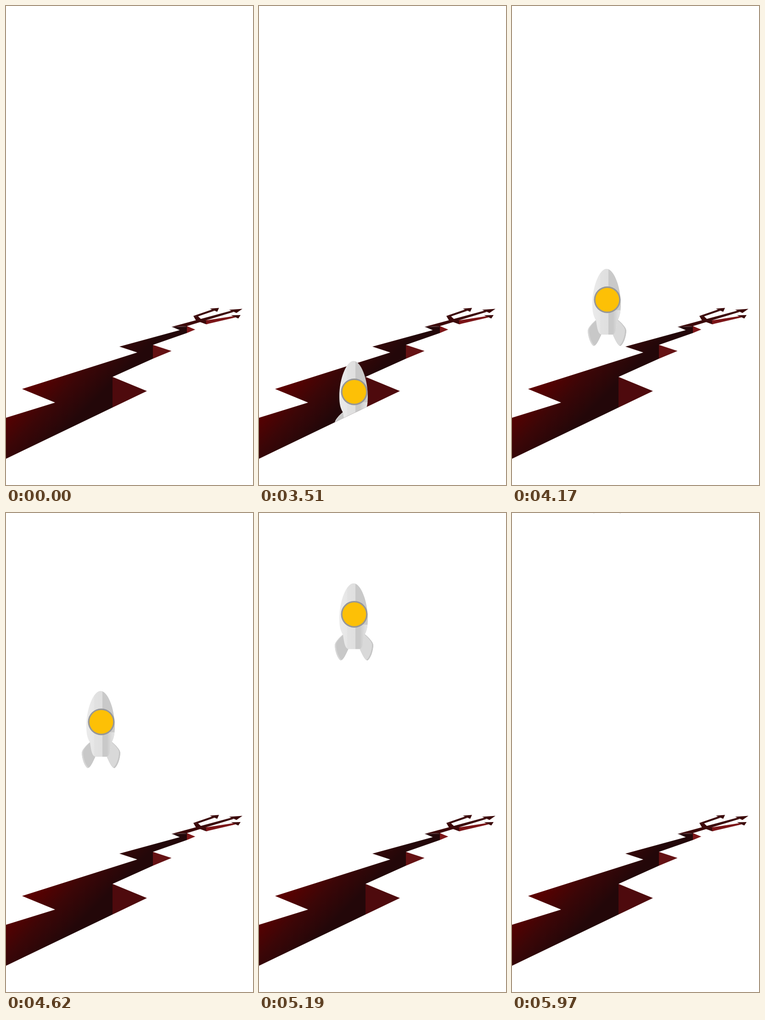
An HTML page with a canvas that plays this animation: 538 px wide and 1040 px high, repeating every 6.03 s.

```html
<!DOCTYPE html>
<html lang="en">
<head>
<meta charset="utf-8">
<title>Rocket launch</title>
<style>
html, body { margin: 0; width: 100%; height: 100%; overflow: hidden; background: #fff; }
canvas { display: block; width: 538px; height: 1040px; }
</style>
</head>
<body>
<canvas id="stage" width="538" height="1040"></canvas>
<script>
const W = 538, H = 1040;
const ctx = document.getElementById('stage').getContext('2d');

function trace(points) {
  ctx.beginPath();
  for (const [x, y] of points) ctx.lineTo(x, y);
  ctx.closePath();
}

function poly(fill, ...points) {
  trace(points);
  ctx.fillStyle = fill;
  ctx.fill();
}

function gradient(x0, y0, x1, y1, ...stops) {
  const g = ctx.createLinearGradient(x0, y0, x1, y1);
  for (const [at, color] of stops) g.addColorStop(at, color);
  return g;
}

const add = ([x, y], dx, dy) => [x + dx, y + dy];
const mix = ([x0, y0], [x1, y1], k) => [x0 + (x1 - x0) * k, y0 + (y1 - y0) * k];

// --- Crack: three notches shrinking into the distance ---

const RIGHT = 1.04; // right teeth are a little larger than left ones
const notches = [
  { left: [35, 831.5], right: [232, 805.3], w: 72, h: 29.5, drop: 66.5, face: '#4e0a0d' },
  { left: [247, 739.5], right: [320, 735.8], w: 39, h: 12.7, drop: 30, face: '#651214' },
  { left: [361, 696.5], right: [394, 695], w: 17.5, h: 7.2, drop: 15, face: '#7e1719' },
];
const tooth = n => add(n.right, n.w * RIGHT, n.h * RIGHT);
const foot = n => add(n.right, 0, n.drop);

const crack = [
  [0, 894],
  ...notches.flatMap(n => [add(n.left, n.w, n.h), n.left]),
  ...[...notches].reverse().flatMap(n => [n.right, foot(n)]),
  [0, 983],
];
const depth = gradient(40, 840, 125, 925, [0, '#5c0000'], [0.5, '#3b0607'], [1, '#230709']);
const ink = '#3c090a';

// A shaft tapering from the edge a-b to an arrow head with its upper barb given
function prong(fill, a, b, barb, tip) {
  const low = add(barb, 16, 7);
  poly(fill, a, mix(barb, low, 0.3), mix(barb, low, 0.65), b);
  poly(ink, barb, tip, low);
}

function drawCrack() {
  poly(depth, ...crack);
  for (const n of notches) poly(n.face, n.right, tooth(n), foot(n));

  const { left, right } = notches[2], bend = [436, 682.5], heel = [436, 691];
  prong(ink, left, right, [486, 659.5], [515, 657.5]);
  prong(ink, [408, 673], [418, 674], [444, 657], [464, 655.5]);
  prong('#7c1518', bend, heel, [490, 671.5], [511, 671]);
  poly(ink, [408, 673], [418, 673.5], [425, 680], bend, heel, [414, 683]);
  poly('#7c1518', bend, add(bend, 3, -0.5), add(heel, 3, -0.6), heel);
  poly('#6f5354', left, add(left, 32, 0), add(left, 32, 0.6), add(left, 0, 0.6));
}

// --- Rocket, measured from the height of its nose tip ---

const body = new Path2D('M206 0 C191 0 175 37 175 78 C175 92 177 103 183 112 C185 126 187 143 196 143 H218 C226 143 228 126 230 112 C235 103 237 92 237 78 C237 37 221 0 206 0Z');
const fin = new Path2D('M184 110 C175 117 166 127 165 133 C164 145 171 165 178 168 C184 167 190 153 195 142 C188 140 185 126 184 110Z');
const shell = gradient(175, 0, 237, 0, [0, '#ebebeb'], [0.27, '#e6e6e6'], [0.27, '#e2e2e2'],
  [0.56, '#dfdfdf'], [0.56, '#c9c9c9'], [1, '#c9c9c9']);
const glow = gradient(220, 0, 237, 0, [0, '#e2e2e200'], [0.7, '#e0e0e0'], [1, '#e4e4e4']);

function drawFin(rim, face) {
  ctx.save();
  ctx.clip(fin);
  ctx.fillStyle = rim;
  ctx.fill(fin);
  ctx.translate(3, -1);
  ctx.fillStyle = face;
  ctx.fill(fin);
  ctx.restore();
}

function drawBody() {
  ctx.save();
  ctx.clip(body);
  ctx.fillStyle = shell;
  ctx.fillRect(170, 0, 70, 145);
  ctx.fillStyle = glow;
  ctx.fillRect(210, 90, 30, 55);
  ctx.restore();
}

function disc(r, fill) {
  ctx.beginPath();
  ctx.arc(207.5, 67.3, r, 0, Math.PI * 2);
  ctx.fillStyle = fill;
  ctx.fill();
}

function drawRocket(tip) {
  ctx.save();
  // Everything below the near rim of the crack stays hidden
  trace([[0, 0], [W, 0], [W, 725], tooth(notches[0]), foot(notches[0]), [0, 983]]);
  ctx.clip();
  ctx.translate(0, tip);
  drawFin('#d7d7d7', '#c8c8c8');
  ctx.save();
  ctx.translate(2 * 207, 0);
  ctx.scale(-1, 1);
  drawFin('#c6c6c6', '#d9d9d9');
  ctx.restore();
  drawBody();
  disc(29, '#979797');
  disc(25.8, '#fdc006');
  ctx.restore();
}

// --- Motion: slow climb, a one-step rest, then a faster flight ---

const LOOP = 6030, STEP = 30, LAUNCH = 3060, REST = 3870, END = 5970;
const CLIMB = 0.248, FLIGHT = 0.4097; // px per ms

function tipAt(t) {
  const climb = Math.min(t, REST) - LAUNCH;
  const flight = Math.max(0, Math.min(t, END) - REST - STEP);
  return 882 - CLIMB * climb - FLIGHT * flight;
}

function draw(now) {
  const t = Math.floor((now % LOOP) / STEP) * STEP;
  ctx.fillStyle = '#fff';
  ctx.fillRect(0, 0, W, H);
  drawCrack();
  if (t >= LAUNCH) drawRocket(tipAt(t));
}

const start = performance.now();
function tick() {
  draw(performance.now() - start);
  requestAnimationFrame(tick);
}
tick();
</script>
</body>
</html>
```
